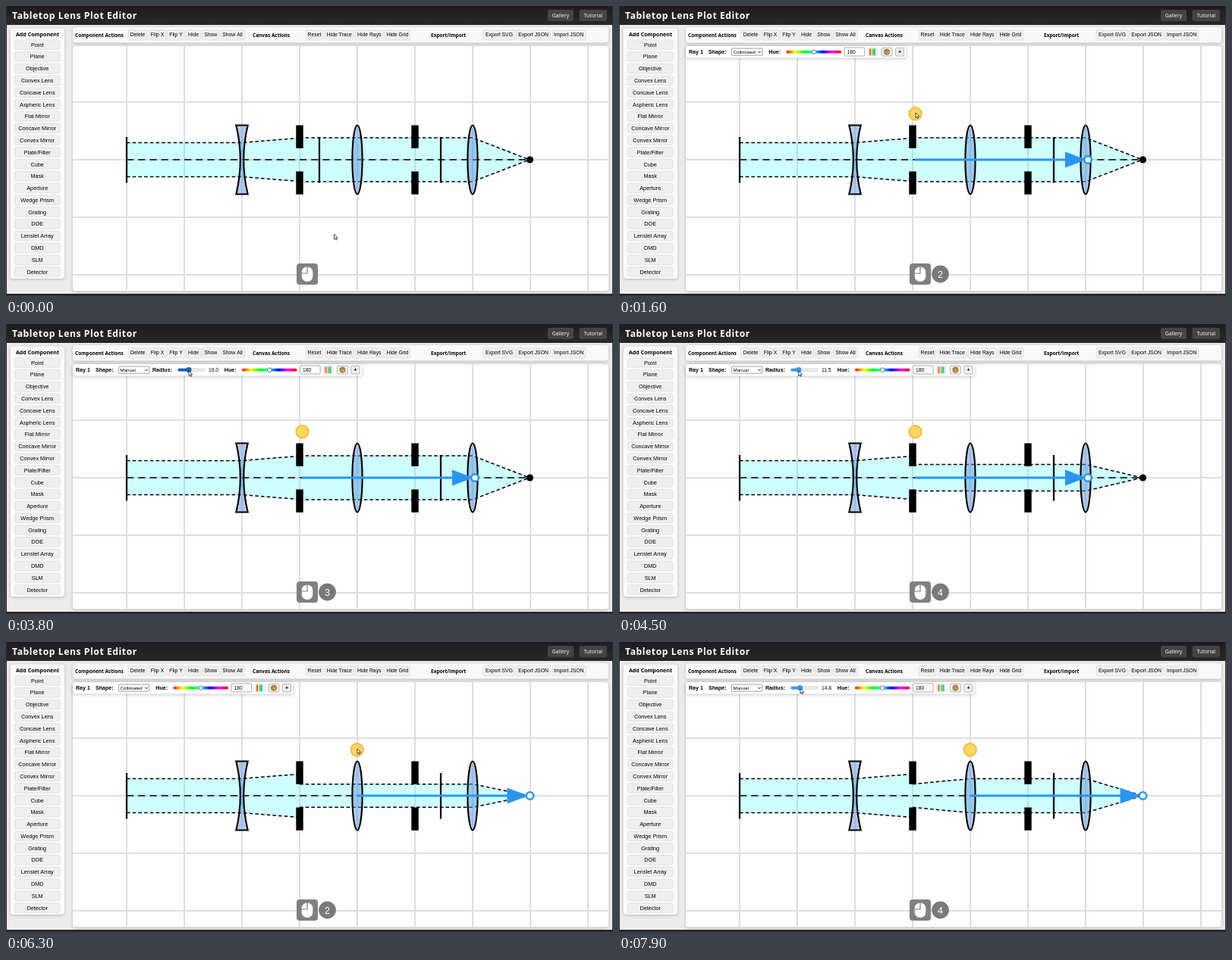
Animation, 800 px wide and 383 px high, one loop 8000 ms. Source, as an HTML page with a canvas:

```html
<!DOCTYPE html>
<html lang="en">
<head>
<meta charset="utf-8">
<title>Tabletop Lens Plot Editor</title>
<style>
html, body { margin: 0; width: 100%; height: 100%; overflow: hidden; background: #ececec; }
canvas { display: block; width: 800px; height: 383px; }
</style>
</head>
<body>
<canvas id="stage"></canvas>
<script>
const W = 800, H = 383, LOOP = 8000, AXIS = 203, UNIT = 1.52;
const SANS = '"Liberation Sans", Arial, sans-serif';
const HEAD = '"Open Sans", "Noto Sans", sans-serif';
const BLUE = '#2b95ee';
const canvas = document.getElementById('stage');
const dpr = window.devicePixelRatio || 1;
canvas.width = W * dpr;
canvas.height = H * dpr;
const ctx = canvas.getContext('2d');

const parts = ['Point', 'Plane', 'Objective', 'Convex Lens', 'Concave Lens', 'Aspheric Lens',
  'Flat Mirror', 'Concave Mirror', 'Convex Mirror', 'Plate/Filter', 'Cube', 'Mask', 'Aperture',
  'Wedge Prism', 'Grating', 'DOE', 'Lenslet Array', 'DMD', 'SLM', 'Detector'];
const actions = [['Delete', 161, 186], ['Flip X', 188, 211], ['Flip Y', 212.5, 235.5], ['Hide', 237, 257],
  ['Show', 258.5, 281], ['Show All', 282.5, 314.5], ['Reset', 395, 418], ['Hide Trace', 420, 458.5],
  ['Hide Rays', 460, 497.5], ['Hide Grid', 499, 533], ['Export SVG', 629, 671],
  ['Export JSON', 672.5, 717.5], ['Import JSON', 719.5, 764]];
const shapes = ['Collimated', 'Divergent', 'Convergent', 'Manual'];

// Pointer path: time, x, y of the tip
const path = [[0, 432.5, 301.5], [450, 414, 208], [900, 391, 204.5], [1050, 391, 204.5], [1500, 391, 141],
  [1700, 391, 141], [2400, 179.5, 58.5], [2600, 179.5, 58.5], [3000, 168, 100], [3150, 168, 100],
  [3650, 241, 62], [3900, 241, 62], [4700, 236, 62], [4900, 236, 62], [5600, 450.5, 187],
  [5850, 462, 200], [6000, 462, 200], [6250, 463, 141], [6400, 463, 141], [6700, 179.5, 58.5],
  [6800, 179.5, 58.5], [7000, 168, 100.5], [7150, 168, 100.5], [7450, 236.5, 61.5],
  [7550, 236.5, 61.5], [7900, 239, 61.5], [8000, 239.3, 61.5]];

const clamp = (v, a, b) => Math.min(b, Math.max(a, v));
function ease(t, a, b) {
  const k = clamp((t - a) / (b - a), 0, 1);
  return k * k * (3 - 2 * k);
}
const mix = (a, b, k) => a + (b - a) * k;
const within = (t, a, b) => t >= a && t < b;

function pointer(t) {
  let i = 0;
  while (i < path.length - 2 && t >= path[i + 1][0]) i++;
  const [a, b] = [path[i], path[i + 1]], k = ease(t, a[0], b[0]);
  return [mix(a[1], b[1], k), mix(a[2], b[2], k)];
}

function box(x, y, x2, y2, r, fill, line) {
  ctx.beginPath();
  ctx.roundRect(x, y, x2 - x, y2 - y, r);
  if (fill) { ctx.fillStyle = fill; ctx.fill(); }
  if (line) { ctx.strokeStyle = line; ctx.lineWidth = 0.7; ctx.stroke(); }
}

function panel(x, y, x2, y2, fill) {
  ctx.save();
  ctx.shadowColor = 'rgba(0,0,0,.22)';
  ctx.shadowBlur = 4 * dpr;
  ctx.shadowOffsetY = dpr;
  box(x, y, x2, y2, 4, fill);
  ctx.restore();
}

function label(s, x, y, size, opt = {}) {
  ctx.font = `${opt.weight || 400} ${size}px ${opt.family || SANS}`;
  ctx.textAlign = opt.align || 'left';
  ctx.textBaseline = 'alphabetic';
  ctx.fillStyle = opt.color || '#000';
  ctx.letterSpacing = opt.spacing || '0px';
  ctx.fillText(s, x, y + size * 0.36);
}

function disc(x, y, r, fill, line, width) {
  ctx.beginPath();
  ctx.arc(x, y, r, 0, 7);
  ctx.fillStyle = fill;
  ctx.fill();
  if (line) { ctx.strokeStyle = line; ctx.lineWidth = width; ctx.stroke(); }
}

function poly(points, close) {
  ctx.beginPath();
  points.forEach(([x, y]) => ctx.lineTo(x, y));
  if (close) ctx.closePath();
}

function frameUi() {
  ctx.fillStyle = '#ececec';
  ctx.fillRect(0, 0, W, H);
  const bar = ctx.createLinearGradient(0, 0, 0, 25);
  bar.addColorStop(0, '#1d1d1d');
  bar.addColorStop(1, '#282828');
  ctx.fillStyle = bar;
  ctx.fillRect(0, 0, W, 25);
  label('Tabletop Lens Plot Editor', 8, 13, 12.2, { weight: 700, family: HEAD, color: '#fff', spacing: '0.55px' });
  for (const [s, a, b] of [['Gallery', 714, 748], ['Tutorial', 755.5, 792]]) {
    box(a, 5, b, 20, 2.5, '#444');
    label(s, (a + b) / 2, 12.7, 6.9, { family: HEAD, color: '#fff', align: 'center' });
  }
  panel(6, 29.5, 77, 360, '#fafafa');
  label('Add Component', 41.5, 37.5, 7.1, { weight: 700, family: HEAD, align: 'center' });
  parts.forEach((s, i) => {
    const y = 51 + i * 300 / 19;
    box(11.5, y - 6.3, 71, y + 6.3, 2, '#efefef', '#dfdfdf');
    label(s, 41.2, y, 7.3, { align: 'center' });
  });
  panel(88, 28, 794, 48.5, '#f9f9f9');
  for (const [s, x] of [['Component Actions', 91], ['Canvas Actions', 325], ['Export/Import', 560]])
    label(s, x, 38.3, 6.5, { weight: 700, family: HEAD });
  for (const [s, a, b] of actions) {
    box(a, 31.5, b, 45, 2, '#efefef', '#dfdfdf');
    label(s, (a + b) / 2, 38, 6.8, { align: 'center' });
  }
  panel(88, 53, 794, 376.5, '#fefefe');
}

function grid() {
  ctx.fillStyle = '#dedede';
  for (let x = 158; x < 790; x += 76) ctx.fillRect(x, 53, 2, 323.5);
  for (let y = 126; y < 370; y += 76) ctx.fillRect(88, y, 706, 2);
}

// Each section is a list of [x, half height]
function beam(sections) {
  for (const s of sections) {
    poly([...s.map(([x, h]) => [x, AXIS - h]), ...s.slice().reverse().map(([x, h]) => [x, AXIS + h])], true);
    ctx.fillStyle = 'rgba(0,255,255,.19)';
    ctx.fill();
  }
  ctx.strokeStyle = '#000';
  ctx.lineWidth = 1.5;
  ctx.setLineDash([4.6, 3.1]);
  for (const s of sections)
    for (const side of [-1, 1]) {
      poly(s.map(([x, h]) => [x, AXIS + side * h]));
      ctx.stroke();
    }
  ctx.setLineDash([9.2, 6]);
  poly([[159, AXIS], [690, AXIS]]);
  ctx.stroke();
  ctx.setLineDash([]);
}

function glass() {
  ctx.fillStyle = 'rgba(100,150,220,.5)';
  ctx.strokeStyle = '#000';
  ctx.lineWidth = 2.1;
  ctx.lineJoin = 'miter';
  for (const x of [463, 615]) {
    ctx.beginPath();
    ctx.ellipse(x, AXIS, 6.6, 45.5, 0, 0, 7);
    ctx.fill();
    ctx.stroke();
  }
  ctx.beginPath();
  ctx.moveTo(303.3, 157.5);
  ctx.lineTo(318.7, 157.5);
  ctx.quadraticCurveTo(307.7, AXIS, 318.7, 248.5);
  ctx.lineTo(303.3, 248.5);
  ctx.quadraticCurveTo(314.3, AXIS, 303.3, 157.5);
  ctx.closePath();
  ctx.fill();
  ctx.stroke();
}

function plane(x) {
  ctx.fillStyle = '#000';
  ctx.fillRect(x - 1.1, 173, 2.2, 60.5);
}

function stops() {
  ctx.fillStyle = '#000';
  for (const x of [387, 539]) {
    ctx.fillRect(x - 4.7, 157.5, 9.4, 30.3);
    ctx.fillRect(x - 4.7, 218.5, 9.4, 30.3);
  }
}

function heldPlane(x) {
  ctx.fillStyle = '#666';
  ctx.fillRect(x - 5.5, 171, 12, 64.5);
  ctx.fillStyle = '#b9b9b9';
  ctx.fillRect(x - 2.5, 174, 1, 58.5);
  ctx.fillRect(x + 2.5, 174, 1, 58.5);
}

function arrow(x) {
  const end = x + 228;
  ctx.strokeStyle = ctx.fillStyle = BLUE;
  ctx.lineWidth = 3.2;
  poly([[x, AXIS], [end - 28, AXIS]]);
  ctx.stroke();
  poly([[end - 30, AXIS - 10.5], [end - 2, AXIS], [end - 30, AXIS + 10.5]], true);
  ctx.fill();
  disc(end, AXIS, 4.8, '#fff', BLUE, 2.5);
}

function toolbar(t, radius, manual, thumb) {
  const dx = manual ? 90.5 : 0, bold = { weight: 700 };
  panel(88, 53, 378.5 + dx, 68.5, '#fff');
  label('Ray 1', 92, 60.6, 7.1, bold);
  label('Shape:', 118, 60.6, 7.1, bold);
  box(148.3, 56, 188.8, 65.2, 1, '#fff', '#777');
  label(manual ? 'Manual' : 'Collimated', 150.5, 60.6, 6.2);
  ctx.strokeStyle = '#000';
  ctx.lineWidth = 0.9;
  poly([[183.3, 59.8], [185, 61.6], [186.7, 59.8]]);
  ctx.stroke();
  if (manual) {
    const x = 230.3 + radius * 0.56;
    label('Radius:', 193, 60.6, 7.1, bold);
    box(226.5, 59, 262, 62.2, 1.6, '#efefef', '#c4c4c4');
    box(226.5, 58.8, x, 62.4, 1.6, thumb);
    disc(x, 60.6, 3.6, thumb);
    label(radius.toFixed(1), 267, 60.6, 6.7);
  }
  label('Hue:', 197.3 + dx, 60.6, 7.1, bold);
  const hue = ctx.createLinearGradient(220 + dx, 0, 293 + dx, 0);
  for (let i = 0; i <= 12; i++) hue.addColorStop(i / 12, `hsl(${i * 30},100%,50%)`);
  box(220.5 + dx, 58.8, 293 + dx, 62.6, 1.9, hue);
  disc(256.8 + dx, 60.7, 2.7, '#fff', '#777', 1);
  box(297 + dx, 55, 323.7 + dx, 66, 1, '#fff', '#888');
  label('180', 300.5 + dx, 60.6, 6.7);
  box(328.5 + dx, 55.2, 340.5 + dx, 66, 1.5, '#efefef', '#ddd');
  ['#f55', '#fd4', '#4d6', '#3bc'].forEach((c, i) => {
    ctx.fillStyle = c;
    ctx.fillRect(330 + dx + i * 2, 56.5, 2, 8.5);
  });
  box(346 + dx, 55.2, 360 + dx, 66, 1.5, '#efefef', '#999');
  disc(353 + dx, 60.6, 3.6, '#d8a24a', '#7a5426', 0.8);
  for (const [c, x, y] of [['#c33', -1.5, -1], ['#36c', 1, -1.5], ['#393', -0.8, 1.5]])
    disc(353 + dx + x, 60.6 + y, 0.8, c);
  box(364.3 + dx, 55.2, 375.5 + dx, 66, 1.5, '#efefef', '#999');
  label('+', 370 + dx, 60.4, 7, { weight: 700, align: 'center' });
}

function menu(y) {
  const pick = clamp(Math.floor((y - 64.8) / 10.8), 0, 3);
  box(148.3, 65, 188.8, 108, 0, '#fff', '#bbb');
  shapes.forEach((s, i) => {
    const mid = 70 + i * 10.8;
    if (i === pick) box(148.6, mid - 5.4, 188.6, mid + 5.4, 0, '#1f66c4');
    label(s, 150.7, mid, 6.2, { color: i === pick ? '#fff' : '#000' });
  });
}

function clicks(count) {
  box(383, 340, 411, 368, 4, '#808080');
  ctx.beginPath();
  ctx.roundRect(389.7, 344.5, 14.6, 19.5, [7, 7, 7, 7]);
  ctx.fillStyle = '#fff';
  ctx.fill();
  ctx.strokeStyle = '#808080';
  ctx.lineWidth = 1.2;
  poly([[397, 344], [397, 353], [389, 353]]);
  ctx.stroke();
  if (count > 1) {
    disc(423.5, 354, 11.4, '#7a7a7a');
    label(count, 423.5, 354, 12.5, { color: '#fff', align: 'center' });
  }
}

function cursor(x, y) {
  poly([[0, 0], [0, 6.6], [1.5, 5.2], [2.5, 7.5], [3.6, 7], [2.6, 4.8], [4.7, 4.7]]
    .map(([a, b]) => [x + a, y + b]), true);
  ctx.fillStyle = '#fff';
  ctx.fill();
  ctx.strokeStyle = '#222';
  ctx.lineWidth = 0.8;
  ctx.stroke();
}

function draw(t) {
  const [cx, cy] = pointer(t);
  const second = t >= 5850;
  const held = within(t, 450, 1050), planeX = mix(413, 390, ease(t, 450, 900));
  const first = Math.round(mix(19, 10.1, ease(t, 3900, 4700)) * 10) / 10;
  const lensR = Math.round(mix(10.1, 14.8, ease(t, 7550, 7900)) * 10) / 10;
  const manual = within(t, 3100, 5850) || t >= 7100;
  const sun = within(t, 1050, 5850) || t >= 6000;
  const sliding = within(t, 3900, 4750) || t >= 7550;
  const hover = within(t, 3600, 3900) || within(t, 4750, 4950) || within(t, 7400, 7550);
  const thumb = sliding ? '#3a95ee' : hover ? '#1560b8' : '#1a7be0';
  const start = [[159, 22.6], [311, 22.6], [387, 28.6]];
  const a = first * UNIT, b = lensR * UNIT;

  ctx.setTransform(dpr, 0, 0, dpr, 0, 0);
  frameUi();
  grid();
  beam([start, second ? [[387, a], [463, b], [615, b], [690, 0]] : [[387, a], [615, a], [690, 0]]]);
  glass();
  plane(159);
  plane(573);
  if (t < 450) plane(413);
  stops();
  disc(690.5, AXIS, 4.6, '#000');
  if (held) heldPlane(planeX);
  if (t >= 450) arrow(second ? 462.5 : planeX);
  if (sun) disc(second ? 462.7 : 390.5, 142.3, 8.3, '#fdd663', '#f2bd3c', 1.8);
  if (within(t, 1600, 5850) || t >= 6300) toolbar(t, second ? lensR : first, manual, thumb);
  if (within(t, 2450, 3100) || within(t, 6750, 7100)) menu(cy);

  const steps = [[7550, 4], [6800, 3], [6300, 2], [5850, 1], [3900, 4], [2550, 3], [1600, 2], [0, 1]];
  clicks(steps.find(s => t >= s[0])[1]);
  cursor(cx, cy);

  ctx.fillStyle = '#2b2b2e';
  ctx.fillRect(0, 380, W, 3);
  ctx.fillRect(0, 0, 1, H);
  ctx.fillRect(799, 0, 1, H);
}

const begin = performance.now();
function tick(now) {
  draw(Math.max(0, now - begin) % LOOP);
  requestAnimationFrame(tick);
}
draw(0);
requestAnimationFrame(tick);
</script>
</body>
</html>
```
